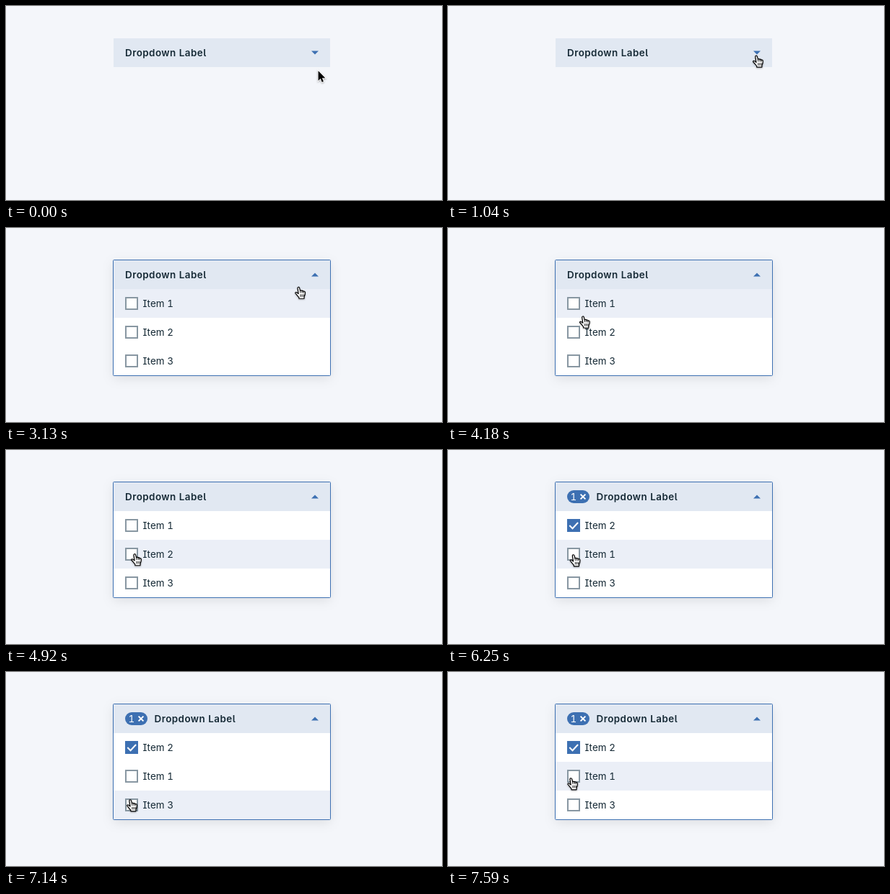
Animation, 604 px wide and 270 px high, one loop 8 s. Source, as an HTML page:

```html
<!DOCTYPE html>
<html lang="en">
<head>
<meta charset="utf-8">
<title>Multi-select dropdown</title>
<style>
  html, body { margin: 0; width: 100%; height: 100%; overflow: hidden; background: #f4f6fa; }
  svg { display: block; width: 604px; height: 270px; }
  text { font: 400 13.4px Inter, "Noto Sans", sans-serif; letter-spacing: .08px; fill: #152935;
         font-feature-settings: "cv08", "cv05", "tnum"; }
  .label { font-weight: 600; letter-spacing: .47px; }
  .blue { fill: #3d70b2; }
  .box { fill: #fff; stroke: #8897a2; stroke-width: 2; }
  .tick { fill: none; stroke: #fff; stroke-width: 2; }
  .panel { fill: #fff; filter: drop-shadow(0 4px 8px rgba(0, 0, 0, .1)); }
  .pointer { filter: drop-shadow(0 1px 1px rgba(0, 0, 0, .3)); }
</style>
</head>
<body>
<svg viewBox="0 0 604 270">
  <g id="menu">
    <rect class="panel" x="149" y="45" width="300" height="160"/>
    <rect id="hover" x="149" width="300" height="40" fill="#ebeff7"/>
    <g id="rows"></g>
  </g>
  <rect x="149" y="45" width="300" height="40" fill="#e1e8f2"/>
  <rect id="frame" x="148.5" y="44.5" width="301" height="161" rx="1" fill="none" stroke="#3d70b2"/>
  <g id="chip">
    <rect class="blue" x="165" y="56" width="31" height="18" rx="9"/>
    <text x="169.4" y="70" style="fill:#fff">1</text>
    <path class="tick" d="M183.6 61.6l6.8 6.8m0-6.8l-6.8 6.8"/>
  </g>
  <text id="label" class="label" y="70">Dropdown Label</text>
  <path id="caret" class="blue" d="M-5-2.4H5L0 2.6z"/>
  <path id="arrow" class="pointer" d="M0 0V13.6L3.1 10.7 5.2 15.7 7.3 14.8 5.3 9.9H9.7z" stroke="#fff" stroke-width="1.8" paint-order="stroke"/>
  <g id="hand" class="pointer" stroke="#000" stroke-width="1.2" stroke-linejoin="round" stroke-linecap="round">
    <path fill="#fff" d="M4.4 2.3C4.2.5 6.5.2 7 1.9L8 6C8.3 5 10 5 10.4 6.2 10.8 5.4 12.3 5.6 12.6 6.9 13.3 6.3 14.8 6.7 14.9 8.2 15 10.5 14.6 12 13.6 13.8L13.4 16.8H6.4L6.2 15C4.8 13.6 3 11 1.6 9.6.6 8.4 2 7.4 3.2 8.2L5.6 10z"/>
    <path fill="none" stroke-width=".9" d="M8 6l.4 2.6m2-2.4l.3 2.4m1.9-1.7l.1 2M8.4 11.2v2.8m2.1-2.8v2.8m2.1-2.8v2.8"/>
  </g>
</svg>
<script>
const LOOP = 8000, STEP = 148.8, OPEN = 2230, PICK = 5660;
const $ = id => document.getElementById(id);

// each glide: start, end, target x, target y
const glides = [
  [0, 290, 421.4, 72],        // onto the header
  [740, 1040, 421.4, 68.4],
  [2980, 3130, 399.5, 81.5],  // down to the list
  [3130, 3430, 260, 107],
  [3580, 3880, 182, 110.5],
  [4030, 4470, 180.5, 135.5], // second row
  [4770, 5060, 168.7, 148],
  [5810, 6250, 168, 145],
  [6250, 7140, 166.5, 177],   // third row and back
  [7290, 7590, 164.6, 147]
];

const progress = (t, from, to) => Math.min(1, Math.max(0, (t - from) / (to - from)));
const easeOut = p => 1 - (1 - p) ** 1.7;
const show = (id, on) => $(id).style.display = on ? "" : "none";
const move = (id, x, y, turn = 0) => $(id).setAttribute("transform", `translate(${x} ${y}) rotate(${turn})`);

function pointerAt(t) {
  let x = 432.6, y = 90.3;
  for (const [from, to, toX, toY] of glides) {
    const p = easeOut(progress(t, from, to));
    x += (toX - x) * p;
    y += (toY - y) * p;
  }
  return [x, y];
}

function row(i, n, checked) {
  const y = 85 + 40 * i;
  const box = checked
    ? `<rect class="blue" x="165" y="${y + 11}" width="18" height="18"/>
       <path class="tick" d="M168.3 ${y + 20}l4.2 4.2 7.6-8.2"/>`
    : `<rect class="box" x="166" y="${y + 12}" width="16" height="16"/>`;
  return `${box}<text x="189.4" y="${y + 25}">Item ${n}</text>`;
}

let drawn = null;
function draw(t) {
  const open = t >= OPEN, picked = t >= PICK, pointing = t > 0;
  if (picked !== drawn) {
    const order = picked ? [2, 1, 3] : [1, 2, 3];
    $("rows").innerHTML = order.map((n, i) => row(i, n, picked && n === 2)).join("");
    $("label").setAttribute("x", picked ? 205.5 : 165);
    drawn = picked;
  }
  show("menu", open);
  show("frame", open);
  show("chip", picked);
  move("caret", 428, 65, 180 * progress(t, OPEN - STEP, OPEN + 2 * STEP));

  const [x, y] = pointerAt(t);
  const hovered = Math.min(2, Math.max(0, Math.floor((y - 84) / 40)));
  $("hover").setAttribute("y", 85 + 40 * hovered);
  show("arrow", !pointing);
  show("hand", pointing);
  move(pointing ? "hand" : "arrow", x, y);
}

// the picture advances in even steps
const start = performance.now();
function tick() {
  const t = (performance.now() - start) % LOOP;
  draw(Math.floor((t + 8) / STEP) * STEP);
  requestAnimationFrame(tick);
}
tick();
</script>
</body>
</html>
```
